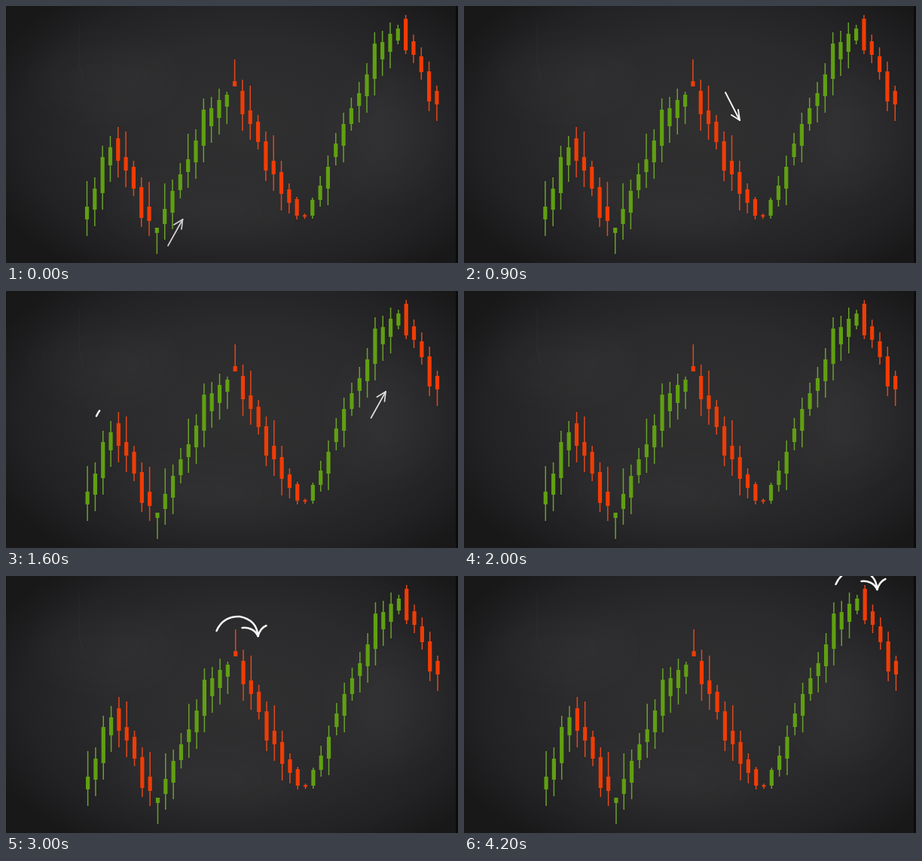
Write an HTML page that moves like this. It is 600 px wide and 342 px high and loops after 4300 ms.

```html
<!DOCTYPE html>
<html lang="en">
<head>
<meta charset="utf-8">
<title>Candlestick swings</title>
<style>
  html, body { margin: 0; width: 100%; height: 100%; overflow: hidden; background: #1a191b; }
  svg { display: block; width: 600px; height: 342px; }
  .up { fill: #609f12; stroke: #6aa22c; }
  .down { fill: #f03c05; stroke: #e2481c; }
  .wick { fill: none; stroke-width: 1.5; }
  .body { stroke: none; }
  .chalk { fill: none; stroke: #f6f6f4; stroke-linecap: round; stroke-linejoin: round; }
</style>
</head>
<body>
<svg viewBox="0 0 600 342">
  <defs>
    <radialGradient id="board" cx="320" cy="165" r="1" gradientUnits="userSpaceOnUse"
      gradientTransform="translate(320 165) scale(370 235) translate(-320 -165)">
      <stop offset="0" stop-color="#303031"/>
      <stop offset=".5" stop-color="#2b2a2c"/>
      <stop offset=".8" stop-color="#222123"/>
      <stop offset="1" stop-color="#191819"/>
    </radialGradient>
    <filter id="soft" x="-50%" y="-50%" width="200%" height="200%">
      <feGaussianBlur stdDeviation="22"/>
    </filter>
  </defs>
  <rect width="600" height="342" fill="url(#board)"/>
  <g filter="url(#soft)" fill="#fff" fill-opacity=".025">
    <ellipse cx="130" cy="95" rx="80" ry="35"/>
    <ellipse cx="510" cy="170" rx="60" ry="70"/>
    <ellipse cx="260" cy="270" rx="110" ry="30"/>
  </g>
  <path d="M97 22V78l5 20" fill="none" stroke="#fff" stroke-opacity=".035"/>
  <rect x="597" width="3" height="342" fill="#0d0c0d"/>
  <g id="chart"></g>
  <g id="marks"></g>
</svg>
<script>
const LOOP = 4300, STEP = 100;
const chart = document.getElementById('chart');
const marksLayer = document.getElementById('marks');

function add(parent, tag, attrs) {
  const el = document.createElementNS('http://www.w3.org/2000/svg', tag);
  for (const key in attrs) el.setAttribute(key, attrs[key]);
  return parent.appendChild(el);
}

// Candle bodies [top, bottom], one row per price swing.
const swings = [
  ['up', [[267,284],[243,271],[201,249],[188,212]]],
  ['down', [[176,206],[201,219],[214,243],[241,282],[267,286]]],
  ['up', [[295,302],[270,290],[246,275],[224,245],[204,221],[179,208],[138,186],[136,160],[125,149],[118,134]]],
  ['down', [[100,107],[113,144],[139,157],[154,181],[180,219],[206,224],[221,250],[244,262],[257,279],[278.3,280.3]]],
  ['up', [[258,279],[239,258],[214,243],[183,201],[157,186],[136,157],[116,133],[91,120],[50,97],[48,71],[37,61],[30,46]]],
  ['down', [[17,59],[47,65],[67,88],[87,127],[113,131]]]
];
// Wicks [above, below] that differ from the usual 15 and 22.
const wicks = {
  0: [34,22], 5: [34,22], 6: [8,10], 7: [13,12], 8: [33,20], 9: [0,28], 10: [34,21],
  12: [15,11], 13: [34,21], 18: [4,23], 19: [29,0], 21: [33,21], 22: [9,10], 23: [13,14],
  24: [34,22], 26: [8,14], 27: [3,5], 28: [2,3], 29: [3,4], 30: [13,9], 32: [14,11],
  34: [14,9], 40: [5,5], 41: [5,5], 42: [9,11], 43: [12,10], 44: [13,13], 45: [7,22]
};

let index = 0;
for (const [dir, bodies] of swings) {
  for (const [top, bottom] of bodies) {
    const x = 107.5 + index * 10.32;
    const [above, below] = wicks[index] || [15, 22];
    const g = add(chart, 'g', { class: dir });
    add(g, 'path', { class: 'wick', d: `M${x} ${top - above}V${bottom + below}` });
    add(g, 'rect', { class: 'body', x: x - 2.6, y: top, width: 5.2, height: bottom - top });
    index++;
  }
}

// Strokes: path and the share of the drawing time at which it ends.
const shapes = {
  rise: [['M0 0L19.5 -35', .6], ['M8 -28L19.5 -35', .8], ['M19.5 -35L18 -22', 1]],
  fall: [['M0 0L19 37', .6], ['M8 30L19 37', .8], ['M19 37L17 23', 1]],
  crest: [['M0 0C6 -14 18 -20 31 -19C46 -16 54 -7 55 7', .78],
          ['M34 -4C42 -5 51 -2 55 7', .9], ['M55 7C57 0 61 -5 66 -7', 1]],
  trough: [['M0 0C7 12 20 21 33 19C48 17 54 6 54 -6', .78],
           ['M34 4C41 5 49 2 54 -6', .9], ['M54 -6C56 0 60 5 66 8', 1]]
};

function mark(shape, x, y, start, end, draw, width, opacity = 1) {
  const group = add(marksLayer, 'g', {
    class: 'chalk', transform: `translate(${x} ${y})`, 'stroke-width': width, opacity
  });
  let from = 0;
  const strokes = shapes[shape].map(([d, to]) => {
    const el = add(group, 'path', { d, pathLength: 1, 'stroke-dasharray': '1 2' });
    const stroke = { el, from, to };
    from = to;
    return stroke;
  });
  return { group, strokes, start, end, draw };
}

const marks = [
  mark('rise', 215, 319, -300, 500, 300, 1.7, .82),
  mark('fall', 347, 115, 500, 1200, 300, 1.9),
  mark('rise', 484.5, 169, 1180, 1700, 300, 1.7, .88),
  mark('crest', 120, 166.5, 1570, 2000, 360, 2.5),
  mark('trough', 177, 309, 2010, 2590, 360, 2.5),
  mark('crest', 279.5, 73, 2600, 3180, 360, 2.5),
  mark('trough', 373.5, 286, 3190, 3770, 360, 2.5),
  mark('crest', 493.5, 11, 3760, LOOP, 360, 2.5)
];

function render(t) {
  chart.setAttribute('transform', `translate(${1.6 * t / LOOP} 0)`);
  for (const { group, strokes, start, end, draw } of marks) {
    const shown = t >= start && t < end;
    group.style.display = shown ? '' : 'none';
    if (!shown) continue;
    const p = Math.min(1, (t - start) / draw);
    for (const { el, from, to } of strokes) {
      const part = Math.max(0, Math.min(1, (p - from) / (to - from)));
      el.style.strokeDashoffset = 1 - part;
      el.style.visibility = part > 0 ? 'visible' : 'hidden';
    }
  }
}

function tick() {
  render(Math.floor(performance.now() % LOOP / STEP) * STEP);
  requestAnimationFrame(tick);
}
tick();
</script>
</body>
</html>
```
